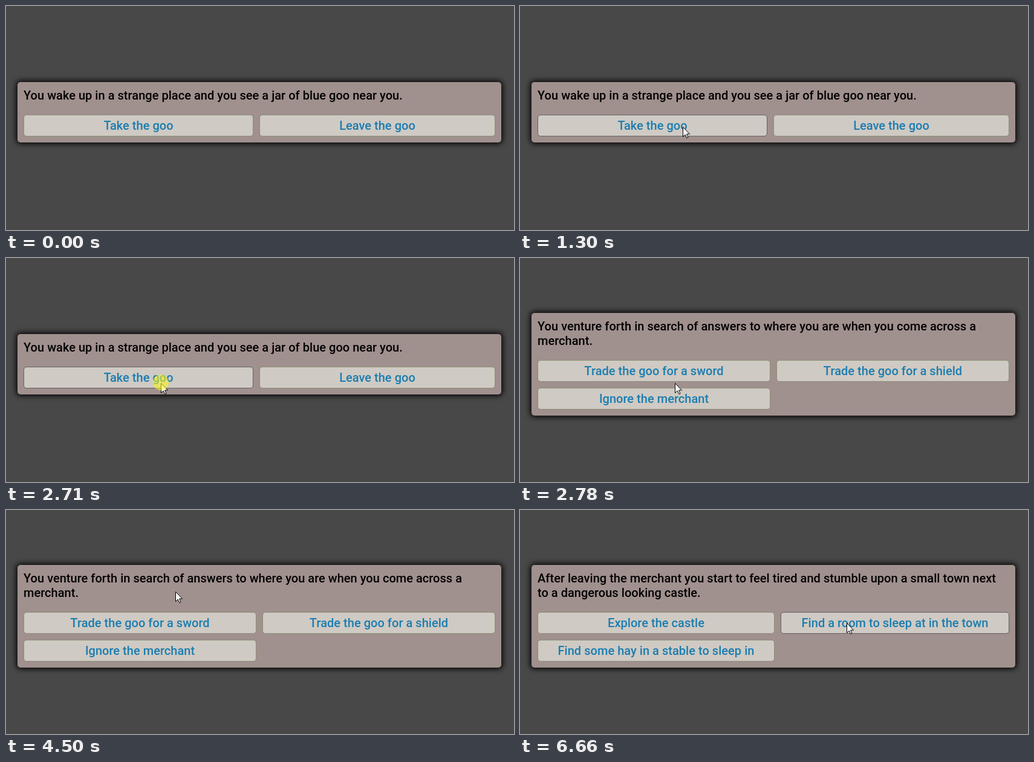
An HTML page that plays this animation: 840 px wide and 371 px high, repeating every 8000 ms.

```html
<!DOCTYPE html>
<html lang="en">
<head>
<meta charset="utf-8">
<title>Text adventure</title>
<style>
  html, body { margin: 0; width: 100%; height: 100%; overflow: hidden; background: #484848; }
  body { position: relative; font: 500 20px/24px Roboto, "Liberation Sans", sans-serif; letter-spacing: .025px; }
  .scene { position: absolute; inset: 0 21px 19px 19px; display: flex; align-items: center; visibility: hidden; }
  .scene.on { visibility: visible; }
  .panel { flex: 1; padding: 10px; border-radius: 5px; background: #a0908e; box-shadow: 0 0 10px 2px #000; }
  .text { margin-bottom: 20px; white-space: pre; color: #000; }
  .options { display: grid; gap: 10px; }
  .btn {
    box-sizing: border-box; height: 36px; padding: 5px; text-align: center; white-space: nowrap;
    color: #1b7db1; background: #cfcac3; border: 1px solid #8b9075; border-radius: 5px;
  }
  .btn.hover { border-color: #626262; }
  #cursor, #click { position: absolute; }
  #cursor { width: 13px; height: 20px; }
  #click { width: 26px; height: 26px; margin: -14px 0 0 -13px; border-radius: 50%; background: rgba(250, 245, 30, .58); }
</style>
</head>
<body>
<svg id="cursor" viewBox="0 0 13 20">
  <path d="M.5.5V16.5L4.2 13 6.8 18.5 9 17.6 6.6 12H11.5Z" fill="#fff" stroke="#000"/>
</svg>
<div id="click"></div>
<script>
const LOOP = 8000;
const STEP = 76; // ms between pointer positions

// left: width of the left column, click: when its option is chosen
const scenes = [
  { start: 0, click: 2710, left: 380,
    text: "You wake up in a strange place and you see a jar of blue goo near you.",
    options: ["Take the goo", "Leave the goo"] },
  { start: 2780, click: 5800, left: 385,
    text: "You venture forth in search of answers to where you are when you come across a\nmerchant.",
    options: ["Trade the goo for a sword", "Trade the goo for a shield", "Ignore the merchant"] },
  { start: 5880, click: LOOP, left: 392,
    text: "After leaving the merchant you start to feel tired and stumble upon a small town next\nto a dangerous looking castle.",
    options: ["Explore the castle", "Find a room to sleep at in the town", "Find some hay in a stable to sleep in"] }
];

// Each move continues from the end of the one before.
const moves = [
  { start: 460, steps: 11, path: [[725, 385], [600, 205], [470, 192], [270, 200]] },
  { start: 1300, steps: 1, path: [[269, 200]] },
  { start: 1470, steps: 10, path: [[220, 161], [150, 203], [179, 204]] },
  { start: 2390, steps: 3, path: [[256, 207]] },
  { start: 3410, steps: 9, path: [[262, 165], [225, 118], [179, 128]] },
  { start: 4190, steps: 9, path: [[243, 126], [294, 139], [311, 144]] },
  { start: 5260, steps: 1, path: [[311, 145]] },
  { start: 5490, steps: 5, path: [[537, 185]] },
  { start: 5880, steps: 1, path: [[539, 187]] },
  { start: 6660, steps: 1, path: [[540, 187]] }
];
moves.forEach((m, i) => { if (i) m.path.unshift(moves[i - 1].path.at(-1)); });

const cursor = document.getElementById("cursor");
const click = document.getElementById("click");

function add(parent, cls, text = "") {
  const el = document.createElement("div");
  el.className = cls;
  el.textContent = text;
  parent.append(el);
  return el;
}

for (const s of scenes) {
  s.el = add(document.body, "scene");
  const panel = add(s.el, "panel");
  add(panel, "text", s.text);
  const grid = add(panel, "options");
  grid.style.gridTemplateColumns = `${s.left}px 1fr`;
  s.buttons = s.options.map(label => add(grid, "btn", label));
}
document.body.append(cursor, click);

// Catmull-Rom curve through the points
function curve(pts, u) {
  const last = pts.length - 1;
  const i = Math.min(Math.floor(u * last), last - 1);
  const f = u * last - i;
  const at = n => pts[Math.max(0, Math.min(last, n))];
  return [0, 1].map(k => {
    const [a, b, c, d] = [-1, 0, 1, 2].map(n => at(i + n)[k]);
    return Math.round(b + f / 2 * (c - a + f * (2 * a - 5 * b + 4 * c - d + f * (3 * (b - c) + d - a))));
  });
}

const latest = (list, t) => list.filter(e => e.start <= t).pop();

function pointer(t) {
  const m = latest(moves, t);
  if (!m) return null;
  const step = Math.min(m.steps, Math.floor((t - m.start) / STEP) + 1);
  return curve(m.path, step / m.steps);
}

function inside(el, [x, y]) {
  const r = el.getBoundingClientRect();
  return x >= r.left && x < r.right && y >= r.top && y < r.bottom;
}

function place(el, pos, shown) {
  el.style.visibility = shown ? "visible" : "hidden";
  if (pos) {
    el.style.left = pos[0] + "px";
    el.style.top = pos[1] + "px";
  }
}

function draw(t) {
  const pos = pointer(t);
  const scene = latest(scenes, t);
  for (const s of scenes) s.el.classList.toggle("on", s === scene);
  for (const b of scene.buttons) b.classList.toggle("hover", !!pos && inside(b, pos));
  place(cursor, pos, pos);
  place(click, pos, t >= scene.click);
}

const begin = performance.now();
function tick() {
  draw((performance.now() - begin) % LOOP);
  requestAnimationFrame(tick);
}
tick();
</script>
</body>
</html>
```
